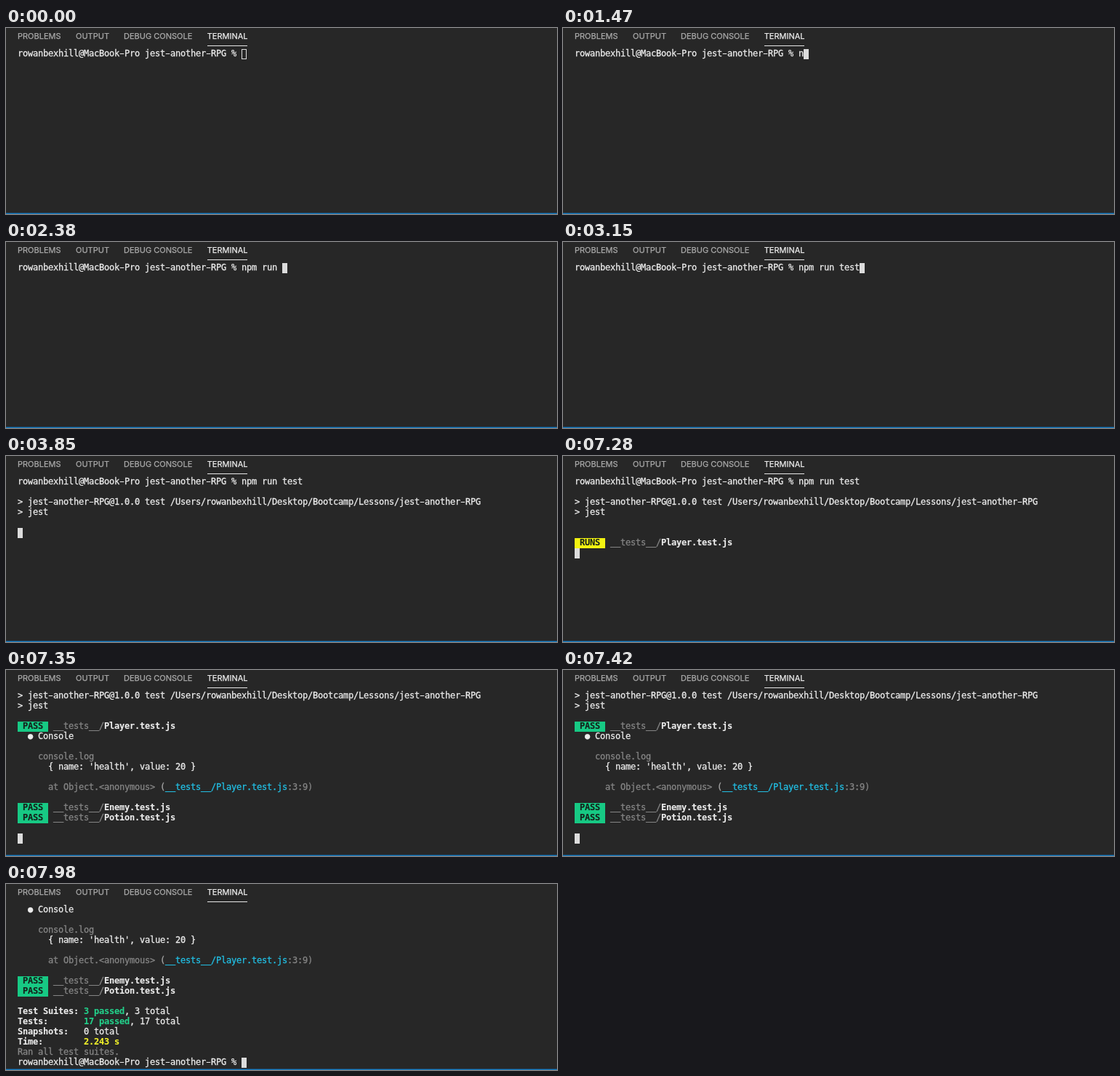
An HTML page with a canvas for the animation above (8 s loop, 758 by 256 pixels).

```html
<!DOCTYPE html>
<html lang="en">
<head>
<meta charset="utf-8">
<title>Terminal test run</title>
<style>
  html, body { margin: 0; width: 100%; height: 100%; overflow: hidden; background: #272727; }
  canvas { display: block; }
</style>
</head>
<body>
<canvas id="stage" width="758" height="256"></canvas>
<script>
const ctx = document.getElementById('stage').getContext('2d');
const LOOP = 8000, LEFT = 16, TOP = 29, CELL = 7, ROW = 14;
const WHITE = '#ececec', DIM = '#858585', GREEN = '#23d18b', YELLOW = '#f2f22a', CYAN = '#22bfe4';

// A line is a list of [text, color, bold, background] runs.
const plain = text => [[text, WHITE]];
const dim = text => [[text, DIM]];
const bold = (text, color = WHITE) => [text, color, true];
const badge = (label, back, file) =>
  [[` ${label} `, '#16201b', true, back], [' __tests__/', DIM], bold(file)];
const pass = file => badge('PASS', '#17c984', file);
const blank = [];

const prompt = 'rowanbexhill@MacBook-Pro jest-another-RPG % ';
const command = 'npm run test';
const header = [
  plain(prompt + command),
  blank,
  plain('> jest-another-RPG@1.0.0 test /Users/rowanbexhill/Desktop/Bootcamp/Lessons/jest-another-RPG'),
  plain('> jest'),
  blank,
];
const running = [...header, blank, badge('RUNS', '#f2f211', 'Player.test.js'), blank];
const results = [
  ...header,
  pass('Player.test.js'),
  plain('  ● Console'),
  blank,
  dim('    console.log'),
  plain("      { name: 'health', value: 20 }"),
  blank,
  [['      at Object.<anonymous> ', DIM], ['(', '#a8a8a8'], ['__tests__/Player.test.js', CYAN], [':3:9)', DIM]],
  blank,
  pass('Enemy.test.js'),
  pass('Potion.test.js'),
  blank,
];
const summary = [
  ...results,
  [bold('Test Suites: '), bold('3 passed', GREEN), [', 3 total', WHITE]],
  [bold('Tests:       '), bold('17 passed', GREEN), [', 17 total', WHITE]],
  [bold('Snapshots:   '), ['0 total', WHITE]],
  [bold('Time:        '), bold('2.243 s', YELLOW)],
  dim('Ran all test suites.'),
];

// Start time, lines, rows scrolled away. The cursor ends the last line.
const screens = [
  [3290, [header[0], blank]],
  [3850, [...header, blank]],
  [5040, running],
  [7350, [...results, blank], 2],
  [7490, [...summary, blank], 6],
  [7840, [...summary, plain(prompt)], 6],
];

// Time and number of typed characters.
const typing = [[1470, 1], [1680, 2], [1890, 3], [1960, 4], [2100, 5], [2240, 7],
  [2380, 8], [2520, 9], [2660, 10], [2800, 11], [3010, 12]];

const latest = (steps, t) => steps.filter(step => t >= step[0]).pop();

function rect(x, y, w, h, color) {
  ctx.fillStyle = color;
  ctx.fillRect(x, y, w, h);
}

// A hairline stroke gives the heavier, smoothed look of the type.
function drawText(text, x, y, color, weight) {
  ctx.fillStyle = ctx.strokeStyle = color;
  ctx.lineWidth = weight;
  ctx.fillText(text, x, y);
  ctx.strokeText(text, x, y);
}

function drawRun(col, row, [text, color, isBold, back]) {
  const x = LEFT + col * CELL, y = TOP + row * ROW;
  if (back) rect(x, y, text.length * CELL, ROW, back);
  ctx.font = `${isBold ? 'bold ' : ''}12px "DejaVu Sans Mono", monospace`;
  [...text].forEach((char, i) => {
    const left = x + i * CELL;
    if (char === '-') rect(left + 0.75, y + 6, 5.5, 1, color);
    else drawText(char, left, y + 10, color, isBold ? 0.1 : 0.3);
  });
}

function drawLine(runs, row) {
  let col = 0;
  for (const run of runs) {
    drawRun(col, row, run);
    col += run[0].length;
  }
  return col;
}

function drawCursor(col, row, focused) {
  const x = LEFT + col * CELL, y = TOP + row * ROW;
  if (focused) return rect(x, y, CELL, ROW, '#dcdcdc');
  ctx.strokeStyle = '#dcdcdc';
  ctx.lineWidth = 1;
  ctx.strokeRect(x + 0.5, y + 0.5, CELL - 1, ROW - 1);
}

function drawFrame() {
  rect(0, 0, 758, 256, '#272727');
  rect(0, 254, 758, 1, '#1d4566');
  rect(0, 255, 758, 1, '#1a80c4');
}

function drawTabs() {
  ctx.font = '11px Inter, sans-serif';
  [['PROBLEMS', 16], ['OUTPUT', 96], ['DEBUG CONSOLE', 162], ['TERMINAL', 276.7]].forEach(([name, x], i) =>
    drawText(name, x, 15, i === 3 ? '#f0f0f0' : '#aaaaaa', 0.25));
  rect(277, 24, 55, 1, '#e7e7e7');
}

function draw(now) {
  const t = now % LOOP;
  const [, typed] = latest(typing, t) || [0, 0];
  const [, lines, scroll = 0] = latest(screens, t)
    || [0, [plain(prompt + command.slice(0, typed))]];
  drawFrame();
  drawTabs();
  let col = 0;
  lines.slice(scroll).forEach((runs, row) => { col = drawLine(runs, row); });
  drawCursor(col, lines.length - scroll - 1, t >= 490);
  requestAnimationFrame(draw);
}
requestAnimationFrame(draw);
</script>
</body>
</html>
```
